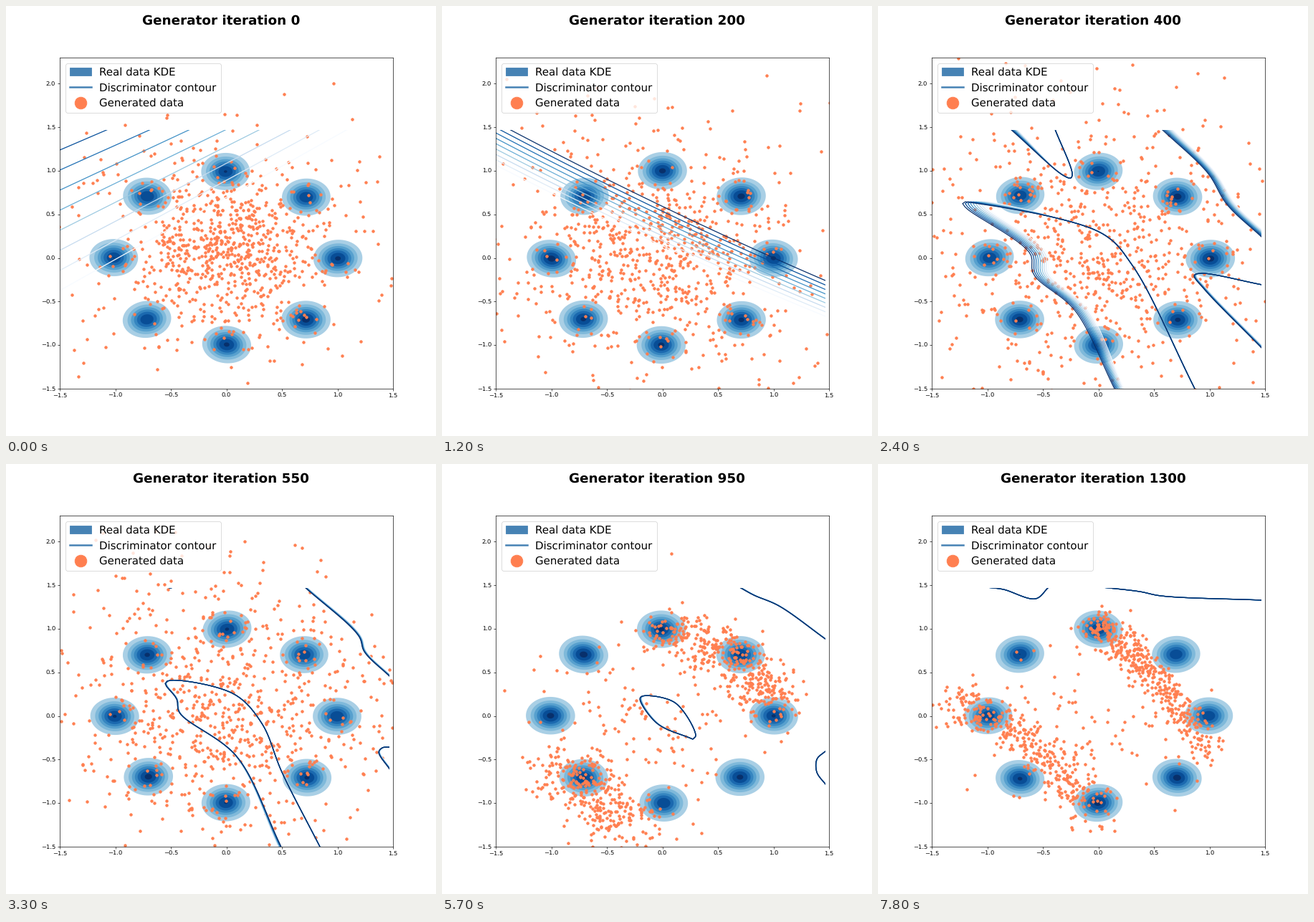
Animation, 600 px wide and 600 px high, one loop 8000 ms. Source, as a matplotlib script:

```python
import numpy as np
import matplotlib.pyplot as plt
from matplotlib.animation import FuncAnimation
from matplotlib.collections import LineCollection, PolyCollection
from matplotlib.lines import Line2D
from matplotlib.patches import Patch, Rectangle

plt.rcParams["text.hinting"] = "none"

STEP_TICKS, TICKS, INTERVAL = 3, 80, 100
BLUES = plt.get_cmap("Blues")
LEVELS = np.linspace(0, 1, 9)
POINTS = 860
MODES = np.arange(8) * np.pi / 4

# Discriminator curves: step -> name -> (bundle width at start, middle, end), key points
CURVES = {
    8: {
        "vee": ((9, 0, 0), [(185, 172), (258, 236), (269, 240), (271, 234), (247, 172)]),
        "corner": ((15, 11, 12), [(396, 172), (460, 233), (487, 277), (536, 323)]),
        "lens": ((13, 30, 0), [(330, 534), (275, 425), (217, 374), (212, 345),
                               (122, 281), (118, 274), (135, 275), (312, 317),
                               (355, 362), (442, 534)]),
        "wedge": ((0, 4, 4), [(536, 389), (450, 373), (441, 376), (455, 395), (536, 478)]),
    },
    11: {
        "vee": ((0, 0, 0), [(225, 171.5), (229, 173), (234, 171.5)]),
        "corner": ((3, 4, 3), [(417, 172), (492, 240), (500, 262), (536, 297)]),
        "lens": ((-4, 2, 0), [(384, 534), (322, 408), (242, 347), (238, 328),
                              (222, 306), (228, 302), (318, 321), (357, 362),
                              (385, 430), (438, 534)]),
        "wedge": ((0, 2, 2), [(536, 395), (525, 396), (520, 402), (536, 427)]),
    },
    15: {
        "vee": ((0, 0, 0), [(216, 172), (253, 179.5), (265, 172)]),
        "corner": ((1, 1, 2), [(292, 172), (320, 186), (415, 217), (490, 262), (536, 317)]),
        "lens": ((0, 18, 0), [(358, 386), (315, 372), (282, 326), (290, 320),
                              (318, 318), (350, 350), (358, 386)]),
    },
    19: {
        "corner": ((2, 1, 1), [(415, 172), (435, 183), (470, 198), (536, 245)]),
        "lens": ((0, 3, 0), [(350, 384), (300, 362), (276, 328), (279, 324),
                             (325, 333), (354, 379), (350, 384)]),
        "wedge": ((0, 1, 0), [(536, 400), (523, 412), (523, 430), (536, 448)]),
    },
    26: {
        "vee": ((0, 0, 0), [(152, 172), (175, 175), (220, 188), (238, 172)]),
        "corner": ((1, 0, 0), [(313, 172), (365, 178), (395, 184), (536, 190)]),
    },
}

# Control points of the two bands that the generated data settles on
RIGHT_BAND = np.array([[(0, 1), (.85, .75), (1, .1)], [(0, 1.05), (.55, .5), (1.02, -.45)]])
LEFT_BAND = np.array([[(-.95, -.55), (-.7, -.9), (-.25, -1.35)],
                      [(-1.3, .15), (-.7, 0), (0, -1.15)]])


def to_data(x, y):
    return np.column_stack([(x - 75) / 155 - 1.5, (534 - y) / 462 * 3.8 - 1.5])


def ease(x):
    x = np.clip(x, 0, 1)
    return x * x * (3 - 2 * x)


def smooth(points, count=140):
    """Centripetal spline through the points, resampled evenly along its length."""
    p = np.array(points, float)
    gap = np.sqrt(np.hypot(*np.diff(p, axis=0).T))[:, None]
    slope = np.diff(p, axis=0) / gap
    inner = (gap[1:] * slope[:-1] + gap[:-1] * slope[1:]) / (gap[1:] + gap[:-1])
    m = np.vstack([slope[:1], inner, slope[-1:]])
    t = np.linspace(0, 1, 20)[:, None]
    curve = np.vstack([
        a + (b - a) * t * t * (3 - 2 * t) + h * t * (1 - t) * (ma * (1 - t) - mb * t)
        for a, b, h, ma, mb in zip(p, p[1:], gap, m, m[1:])])
    length = np.r_[0, np.cumsum(np.hypot(*np.diff(curve, axis=0).T))]
    even = np.linspace(0, length[-1], count)
    return np.column_stack([np.interp(even, length, col) for col in curve.T])


def with_width(widths, points):
    curve = smooth(points)
    start, middle, end = widths
    along = np.linspace(0, 1, len(curve))
    width = np.interp(along, [0, .45, .6, 1], [start, middle, end, end])
    return np.column_stack([curve, width])


SHAPES = {k: {name: with_width(*c) for name, c in curves.items()}
          for k, curves in CURVES.items()}


def straight_bundle(step):
    """Nearly straight level lines that turn over the first steps."""
    t = step / 4
    x = np.linspace(75, 540, 60)
    sag = 1.1e-4 * t * (x - 75) * (540 - x)
    lines = []
    for f in LEVELS:
        left = (397 - 224 * f) * (1 - t) + (222 - 60 * f) * t
        slope = (.15 * f - .56) * (1 - t) + (.458 + .022 * f) * t
        lines.append(to_data(x, left + slope * (x - 75) + sag))
    return lines


def contour_lines(step):
    if step < 6:
        return straight_bundle(step)
    step = max(step, 8)
    a, b = next((a, b) for a, b in zip(list(SHAPES), list(SHAPES)[1:]) if step <= b)
    t = (step - a) / (b - a)
    before, after = SHAPES[a], SHAPES[b]
    lines = []
    for name in ("vee", "corner", "lens", "wedge"):
        if name in before and name in after:
            shape = before[name] * (1 - t) + after[name] * t
        else:
            shape = (before if t < .5 else after).get(name)
        if shape is not None:
            x, y, width = shape.T
            lines += [to_data(x + width * (1 - f), y) for f in LEVELS]
    return lines


def on_band(band, late, s):
    a, b, c = band[0] * (1 - late) + band[1] * late
    s = s[:, None]
    return a * (1 - s)**2 + 2 * b * s * (1 - s) + c * s * s


def generated(step):
    """A spreading cloud that collapses onto two bands."""
    rng = np.random.default_rng(100 + step)
    pick, s = rng.random((2, POINTS))
    noise = rng.normal(size=(POINTS, 2))

    grow = ease(step / 7)
    core = rng.random(POINTS) < .5 - .2 * grow
    spread = np.where(core, .37 + .18 * grow, .68 + .22 * grow)
    cloud = noise * spread[:, None] + (0, .1)

    late = ease((step - 19) / 7)
    rest = np.interp(step, [15, 19, 26], [.38, .16, .1])
    right = pick < .56 * (1 - rest)
    center = np.where(right[:, None], on_band(RIGHT_BAND, late, s**1.2),
                      on_band(LEFT_BAND, late, s))
    width = np.interp(step, [15, 26], [.18, .09]) + .03 * ~right
    settled = center + noise * width[:, None]
    stray = (pick > 1 - rest)[:, None]
    settled = np.where(stray, noise * .48 + (-.15, -.1), settled)

    collapse = ease((step - 11) / 4)
    return cloud * (1 - collapse) + settled * collapse


def density(step):
    """Filled density bands around the eight modes."""
    rng = np.random.default_rng(500 + step)
    turn = np.linspace(0, 2 * np.pi, 70)
    verts, colors = [], []
    for angle in MODES:
        cx, cy = np.array([np.cos(angle), np.sin(angle)]) + rng.normal(0, .006, 2)
        peak, tilt = rng.uniform(6.8, 7.4), rng.normal(0, .04)
        for i in range(1, int(np.ceil(peak))):
            r = .111 * np.sqrt(2 * np.log(peak / i))
            verts.append(np.column_stack([
                cx + r * np.cos(turn), cy + r * .975 * np.sin(turn + tilt)]))
            colors.append(BLUES(.34 + .11 * (i - 1)))
    return verts, colors


fig = plt.figure(figsize=(10, 10), dpi=60)
ax = fig.add_axes([.125, .11, .775, .77])
ax.set(xlim=(-1.5, 1.5), ylim=(-1.5, 2.3))
title = fig.suptitle("", fontsize=22, fontweight="bold")

bands = ax.add_collection(PolyCollection([], zorder=1, linewidths=0), autolim=False)
dots = ax.scatter([], [], s=18, color="coral", zorder=1.5)
lines = ax.add_collection(LineCollection([], linewidths=1.5, zorder=2), autolim=False)
lines.set_clip_path(Rectangle((-1.5, -1.5), 2.97, 2.97, transform=ax.transData))

ax.legend(handles=[
    Patch(color="steelblue", label="Real data KDE"),
    Line2D([], [], color="steelblue", lw=3, label="Discriminator contour"),
    Line2D([], [], color="coral", marker="o", ms=20, lw=0, label="Generated data"),
], loc="upper left", fontsize=18, labelspacing=.47)


def update(tick):
    step = tick // STEP_TICKS
    title.set_text(f"Generator iteration {step * 50}")
    verts, colors = density(step)
    bands.set_verts(verts)
    bands.set_facecolor(colors)
    dots.set_offsets(generated(step))
    segments = contour_lines(step)
    lines.set_segments(segments)
    lines.set_color(np.tile(BLUES(LEVELS), (len(segments) // len(LEVELS), 1)))
    return bands, dots, lines, title


anim = FuncAnimation(fig, update, frames=TICKS, interval=INTERVAL,
                     repeat=True, repeat_delay=0, blit=False)
plt.show()
```
